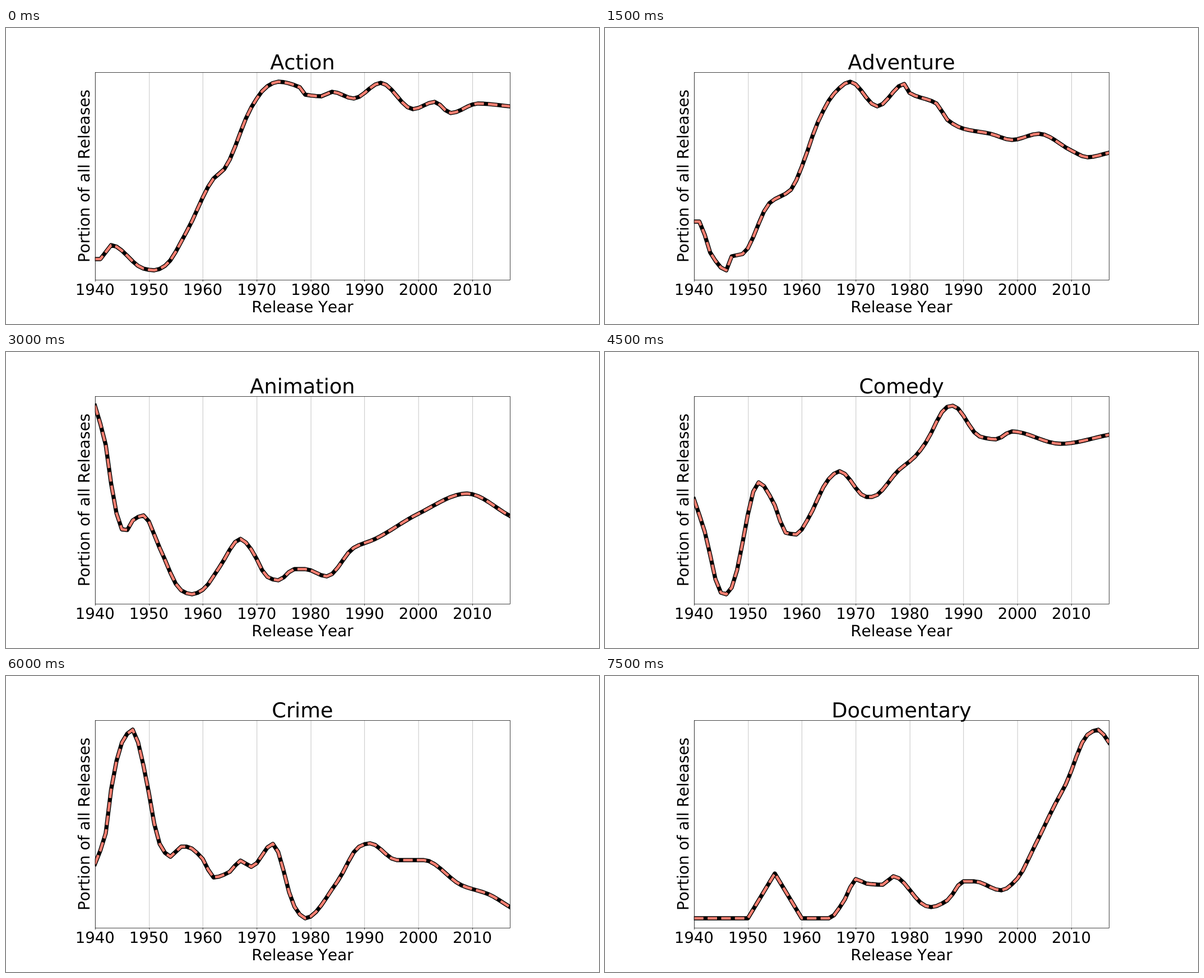
An HTML page that plays this animation: 1058 by 529 pixels, repeating every 8000 ms.

```html
<!DOCTYPE html>
<html lang="en">
<head>
<meta charset="utf-8">
<title>Genre share by release year</title>
<style>
  html, body { margin: 0; height: 100%; overflow: hidden; background: #fff; }
  svg { display: block; width: 100%; height: 100%; }
  text { font: 27.55px "DejaVu Sans", sans-serif; font-kerning: none; text-anchor: middle; text-rendering: geometricPrecision; }
  .label { font-size: 27.85px; }
  #title { font-size: 36.74px; }
  #grid { stroke: #b0b0b0; stroke-width: .73; }
  #ticks, #frame { stroke: #000; stroke-width: .73; fill: none; }
  polyline { fill: none; stroke-linejoin: round; }
  #outline { stroke: #000; stroke-width: 7.35; stroke-linecap: square; }
  #dashes { stroke: salmon; stroke-width: 4.59; stroke-dasharray: 16.99 7.35; }
</style>
</head>
<body>
<svg viewBox="0 0 1058 529">
  <clipPath id="plot"><rect x="158.7" y="79.35" width="740.6" height="370.3"/></clipPath>
  <path id="grid"/>
  <path id="ticks"/>
  <g clip-path="url(#plot)">
    <polyline id="outline"/>
    <polyline id="dashes"/>
  </g>
  <rect id="frame" x="159.3" y="79.45" width="740.3" height="371"/>
  <g id="years"></g>
  <text class="label" x="529" y="507.6">Release Year</text>
  <text class="label" transform="translate(149.3 264.5) rotate(-90)">Portion of all Releases</text>
  <text id="title" x="529" y="74"></text>
</svg>
<script>
const LEFT = 158.7, YEARS = 77, STEP = 740.6 / YEARS;
const SCALE = 1058 / 1152; // grid lines snap to a 1152 px wide raster
const HOLD = 1500, LOOP = 8000;
const el = id => document.getElementById(id);
const yearX = age => LEFT + age * STEP;

let grid = '', ticks = '', labels = '';
for (let age = 0; age < YEARS; age += 10) {
  const x = yearX(age), line = (Math.round(x / SCALE) + .5) * SCALE;
  grid += `M${line} 79.4V450`;
  ticks += `M${line} 450v3.4`;
  labels += `<text x="${x}" y="477.4">${1940 + age}</text>`;
}
el('grid').setAttribute('d', grid);
el('ticks').setAttribute('d', ticks);
el('years').innerHTML = labels;

// Monotone cubic through the keys, sampled once per year.
function curve(keys) {
  const secants = keys.slice(1).map(([x, y], i) => (y - keys[i][1]) / (x - keys[i][0]));
  const slopes = keys.map((_, i) => {
    const a = secants[i - 1] ?? secants[i], b = secants[i] ?? a;
    return a * b > 0 ? 2 * a * b / (a + b) : 0;
  });
  const points = [];
  for (let age = 0, i = 0; age <= YEARS; age++) {
    if (age > keys[i + 1][0]) i++;
    const [x0, y0] = keys[i], [x1, y1] = keys[i + 1];
    const w = x1 - x0, t = (age - x0) / w, u = 1 - t;
    const y = u * u * (1 + 2 * t) * y0 + t * t * (1 + 2 * u) * y1
      + t * u * w * (u * slopes[i] - t * slopes[i + 1]);
    points.push(`${yearX(age).toFixed(2)},${y.toFixed(2)}`);
  }
  return points.join(' ');
}

// Keys are [years since 1940, height on the stage].
const charts = [];
const addChart = (title, ...keys) => charts.push({ title, points: curve(keys) });

addChart('Action',
  [0, 413], [1, 413], [3, 388], [9, 430], [11, 433], [13, 425], [17, 364], [22, 269],
  [24, 252], [29, 142], [32, 104], [34, 96], [38, 106], [39, 119], [42, 122], [44, 114],
  [48, 126], [53, 98], [59, 145], [63, 132], [66, 152], [71, 135], [77, 140]);

addChart('Adventure',
  [0, 346], [1, 346], [3, 401], [6, 433], [7, 408], [9, 404], [14, 313], [18, 289],
  [20, 248], [23, 168], [26, 117], [29, 96], [34, 140], [39, 100], [40, 116], [45, 135],
  [47, 164], [50, 180], [55, 189], [59, 200], [64, 189], [70, 219], [73, 231], [77, 223]);

addChart('Animation',
  [0, 96], [2, 166], [3, 235], [5, 317], [6, 318], [7, 301], [9, 292], [12, 350],
  [16, 426], [18, 433], [20, 425], [23, 386], [27, 334], [29, 353], [32, 402], [34, 408],
  [37, 388], [39, 388], [43, 401], [48, 350], [52, 334], [60, 289], [69, 253], [77, 293]);

addChart('Comedy',
  [0, 263], [2, 321], [5, 430], [6, 433], [7, 421], [12, 233], [15, 274], [17, 323],
  [19, 326], [21, 301], [25, 227], [27, 213], [32, 259], [33, 259], [38, 211], [41, 187],
  [43, 162], [47, 98], [48, 96], [53, 151], [56, 156], [59, 142], [68, 164], [77, 148]);

addChart('Crime',
  [0, 336], [2, 281], [3, 203], [5, 119], [7, 96], [9, 160], [12, 300], [14, 323],
  [16, 305], [17, 305], [20, 327], [22, 360], [25, 350], [27, 330], [29, 341], [33, 300],
  [37, 412], [39, 433], [45, 367], [49, 305], [51, 299], [56, 329], [61, 329], [68, 374],
  [73, 390], [77, 413]);

addChart('Documentary',
  [0, 433], [10, 433], [11, 417], [14, 369], [15, 353], [16, 369], [19, 417], [20, 433],
  [25, 433], [28, 399], [30, 363], [32, 371], [35, 373], [37, 358], [43, 411], [44, 413],
  [47, 401], [50, 367], [52, 367], [57, 383], [60, 362], [63, 308], [67, 229], [69, 193],
  [73, 105], [75, 96], [77, 119]);

let shown;
function draw() {
  const chart = charts[Math.floor(performance.now() % LOOP / HOLD)];
  if (chart !== shown) {
    shown = chart;
    el('title').textContent = chart.title;
    el('outline').setAttribute('points', chart.points);
    el('dashes').setAttribute('points', chart.points);
  }
  requestAnimationFrame(draw);
}
draw();
</script>
</body>
</html>
```
